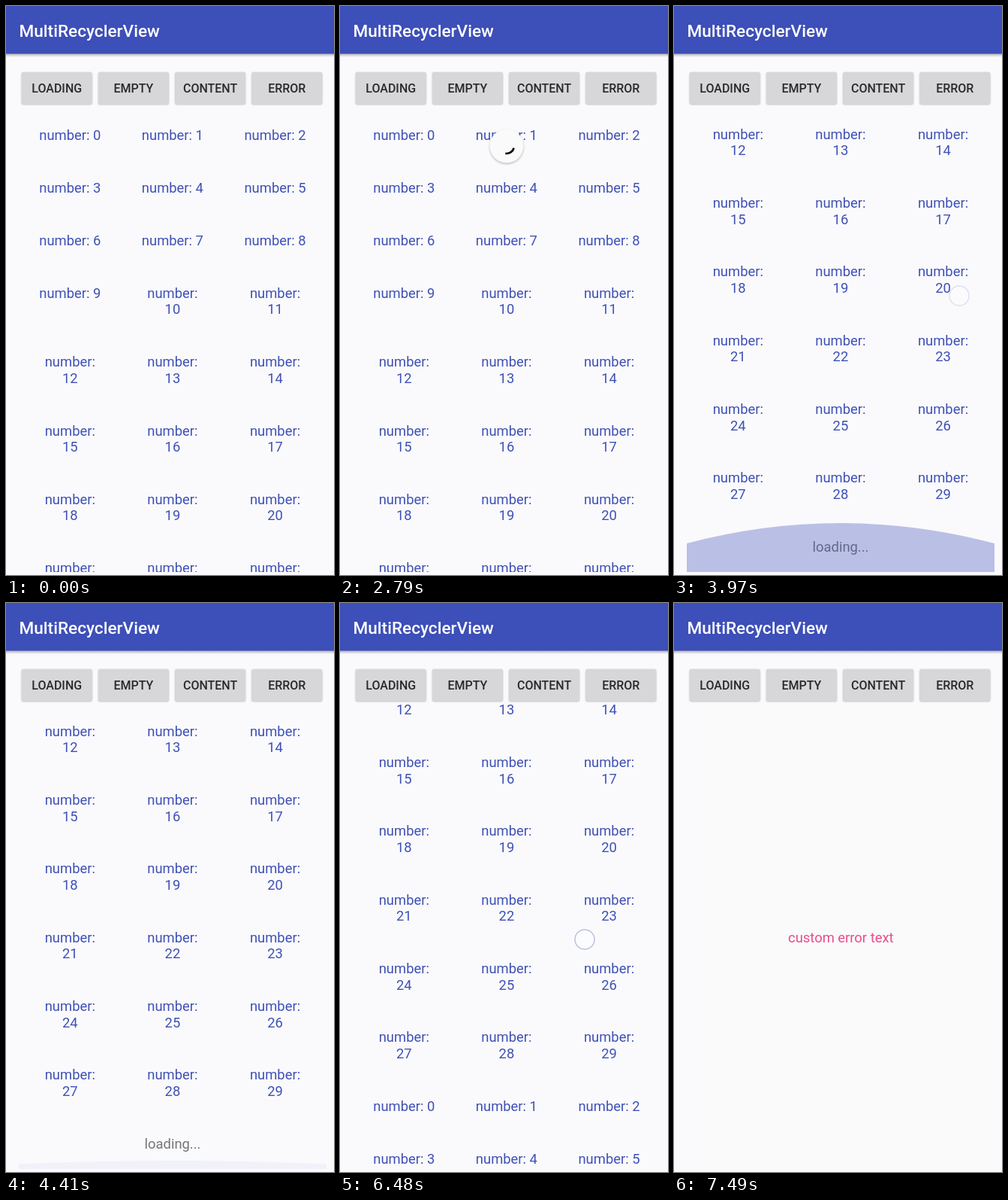
An HTML page that plays this animation: 437x756 px, repeating every 8 s.

```html
<!DOCTYPE html>
<html lang="en">
<head>
<meta charset="utf-8">
<title>MultiRecyclerView</title>
<style>
  html, body { margin: 0; width: 100%; height: 100%; overflow: hidden; background: #fafafd; }
  svg { display: block; width: 100vw; height: 100vh; font-family: Roboto, sans-serif; }
  .item { font-size: 18.4px; fill: #3f51b5; text-anchor: middle; }
  .btn { font-size: 16px; font-weight: 500; fill: #29282b; text-anchor: middle; }
</style>
</head>
<body>
<svg id="stage" viewBox="0 0 437 756">
  <defs>
    <clipPath id="view"><rect x="17" y="135" width="410" height="617"/></clipPath>
    <linearGradient id="drop" x2="0" y2="1">
      <stop offset="0" stop-color="#000" stop-opacity=".3"/>
      <stop offset="1" stop-color="#000" stop-opacity="0"/>
    </linearGradient>
    <filter id="soft" x="-30%" y="-30%" width="160%" height="160%"><feGaussianBlur stdDeviation="1.6"/></filter>
    <filter id="faint" x="-10%" y="-20%" width="120%" height="140%"><feGaussianBlur stdDeviation="1"/></filter>
  </defs>
  <rect width="437" height="756" fill="#fafafd"/>
  <g id="list" clip-path="url(#view)">
    <g id="rows"></g>
    <path id="glow" fill="#3f51b5" d="M-205 0V-38Q0 -92 205 -38V0Z"/>
  </g>
  <g id="error">
    <rect x="41" y="131" width="386" height="625" fill="#fafafa"/>
    <text class="item" x="222.3" y="451" style="fill:#ea4c89">custom error text</text>
  </g>
  <g id="buttons"></g>
  <rect y="63" width="437" height="5" fill="url(#drop)"/>
  <rect width="437" height="63.5" fill="#3d4fb8"/>
  <text x="17.5" y="41" font-size="22.6" font-weight="500" fill="#fff">MultiRecyclerView</text>
  <g id="spinner">
    <circle cy="1.5" r="22.5" fill="#000" opacity=".25" filter="url(#soft)"/>
    <circle r="22.5" fill="#fafafa"/>
    <path id="arc" fill="none" stroke="#000" stroke-width="2.7"/>
    <path id="arrow" d="M-5 0H5L0 5.5Z"/>
  </g>
  <circle id="touch" r="13" fill="#fff" fill-opacity=".35" stroke="#b4bae0" stroke-width="1.5"/>
</svg>
<script>
const LOOP = 8000, STEP = 146, END = 302.5;
const $ = id => document.getElementById(id);

function add(parent, tag, attrs, text) {
  const el = document.createElementNS('http://www.w3.org/2000/svg', tag);
  for (const k in attrs) el.setAttribute(k, attrs[k]);
  if (text !== undefined) el.textContent = text;
  return parent.appendChild(el);
}
const set = (id, attrs) => { for (const k in attrs) $(id).setAttribute(k, attrs[k]); };
const show = (id, on) => set(id, { display: on ? 'inline' : 'none' });

// Buttons
['LOADING', 'EMPTY', 'CONTENT', 'ERROR'].forEach((label, i) => {
  const x = 20.8 + i * 102.2, box = { x, y: 87.8, width: 93.8, height: 42.2, rx: 2 };
  add($('buttons'), 'rect', { ...box, y: 88.8, opacity: .25, filter: 'url(#faint)' });
  add($('buttons'), 'rect', { ...box, fill: '#d7d6d9', id: 'b' + i });
  add($('buttons'), 'text', { class: 'btn', x: x + 46.9, y: 115.3 }, label);
});

// One batch of 30 numbers; returns the baseline following it
function addBatch(id, y) {
  const g = add($('rows'), 'g', { id });
  for (let n = 0; n < 30; n++) {
    const x = 85.3 + (n % 3) * 136.6;
    if (n < 10) add(g, 'text', { class: 'item', x, y }, 'number: ' + n);
    else {
      add(g, 'text', { class: 'item', x, y }, 'number:');
      add(g, 'text', { class: 'item', x, y: y + 21.5 }, n);
    }
    if (n % 3 === 2) y += n < 10 ? 69.85 : 91.35;
  }
  return y;
}
const footY = addBatch('first', 178.3);
add($('rows'), 'text', { class: 'item', id: 'footer', x: 222, y: footY, style: 'fill:#757575' }, 'loading...');
addBatch('more', footY);

// cubic-bezier(.4, 0, .2, 1)
function ease(x) {
  let lo = 0, hi = 1;
  for (let i = 0; i < 20; i++) {
    const u = (lo + hi) / 2, v = 1 - u;
    if (1.2 * v * v * u + .6 * v * u * u + u * u * u < x) lo = u; else hi = u;
  }
  return lo * lo * (3 - 2 * lo);
}

const pose = (t, start, list) =>
  list[Math.min(list.length - 1, Math.floor((t - start) / STEP))];

function drawArc(from, sweep) {
  const r = 10, at = a => {
    const q = a * Math.PI / 180;
    return (r * Math.cos(q)).toFixed(2) + ' ' + (r * Math.sin(q)).toFixed(2);
  };
  set('arc', { d: `M${at(from)}A${r} ${r} 0 ${sweep > 180 ? 1 : 0} 1 ${at(from + sweep)}` });
  set('arrow', { transform: `rotate(${from + sweep}) translate(${r} 0)` });
}

function drawSpinner(t) {
  const on = t >= 730 && t < 3370;
  show('spinner', on);
  if (!on) return;
  const y = pose(t, 730, [198, 226, 192, 186]);
  const scale = t < 3080 ? 1 : pose(t, 3080, [.85, .35]);
  set('spinner', { transform: `translate(222 ${y}) scale(${scale})` });
  const tick = 730 + Math.floor((t - 722) / 147.1) * 147.1;
  const phase = Math.max(0, (tick - 1130) / 1332), turn = Math.floor(phase), part = phase - turn;
  const tail = ease(Math.min(1, part * 2)), head = ease(Math.max(0, part * 2 - 1));
  const pull = pose(t, 730, [-60, 0, 0]);
  drawArc(202 + pull + 266 * (turn + tail) + 340 * phase, 288 - 266 * (tail - head));
  show('arrow', t < 1020);
}

// Finger position [x, y, opacity]
function finger(t) {
  if (t < 730) return null;
  if (t < 1165) return pose(t, 730, [[277, 430, 1], [277, 565, 1], null]);
  if (t < 3670) return null;
  if (t < 4400) return pose(t, 3670, [[364, 560, .9], [373, 450, .9], [380, 385, .4], null]);
  if (t < 6480) return null;
  return pose(t, 6480, [[326, 447, .9], [334, 340, .5], null, null, null, null, [374, 110, .8], null]);
}

function draw(t) {
  let scroll = 0;
  if (t >= 6480) scroll = END + pose(t, 6480, [50, 190, 300, 370, 410, 430, 435]);
  else if (t >= 3670) scroll = pose(t, 3670, [60, 190, END]);
  set('rows', { transform: `translate(0 ${-scroll})` });

  const failed = t >= 7490;
  show('list', !failed);
  show('error', failed);
  show('footer', t < 5880);
  show('more', t >= 5880);

  const glowing = t >= 3960 && t < 6480;
  show('glow', glowing);
  if (glowing) {
    const [size, alpha] = pose(t, 3960, [[1, .34], [.75, .24], [.45, .13], [.17, .05]]);
    set('glow', { transform: `translate(222 752) scale(1 ${size})`, opacity: alpha });
  }

  drawSpinner(t);
  set('b3', { fill: t >= 7350 && !failed ? '#c3c2c5' : '#d7d6d9' });

  const p = failed ? null : finger(t);
  show('touch', p);
  if (p) set('touch', { cx: p[0], cy: p[1], opacity: p[2] });
}

const begun = performance.now();
function frame() {
  draw((performance.now() - begun) % LOOP);
  requestAnimationFrame(frame);
}
frame();
</script>
</body>
</html>
```
